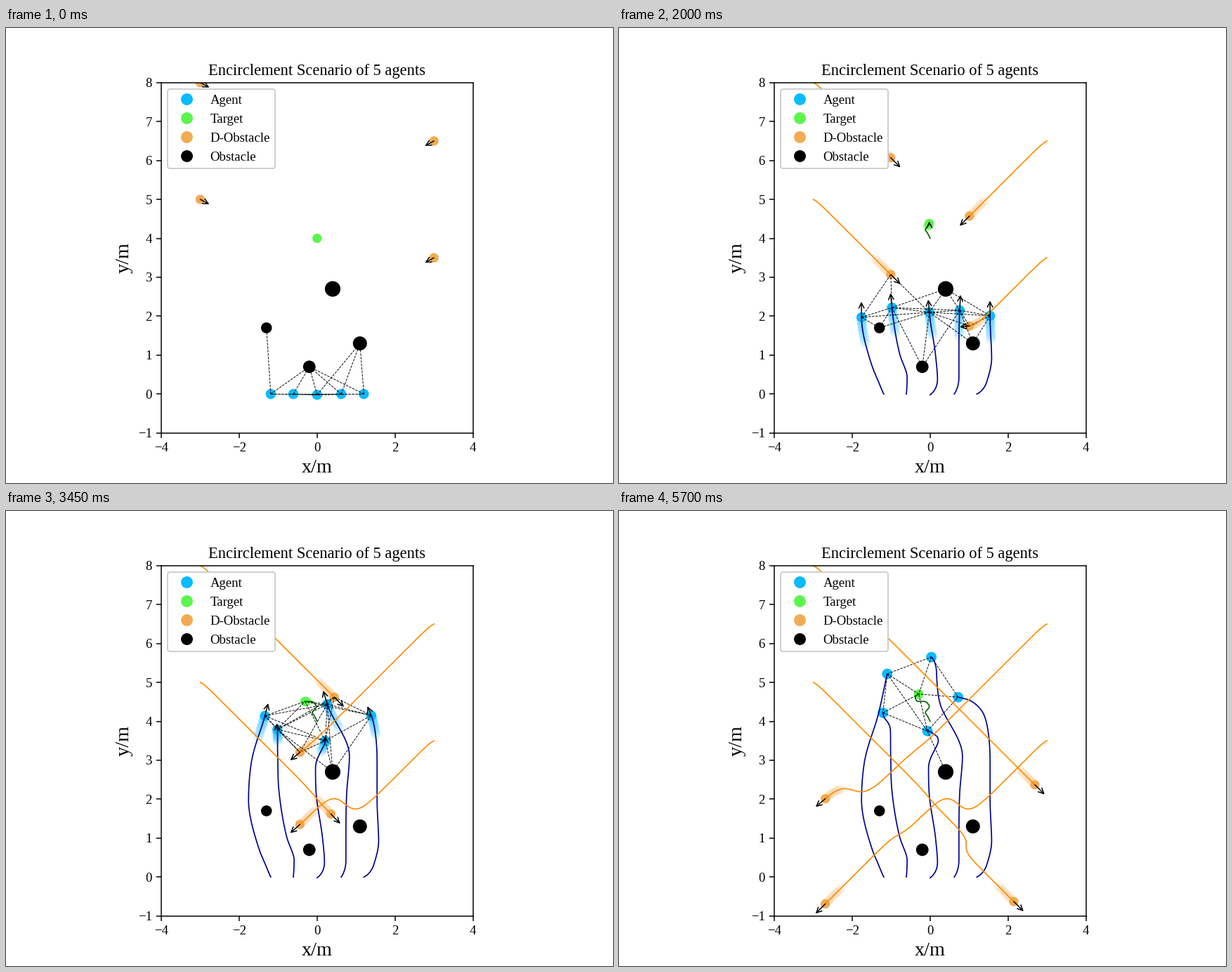
These frames come from a looping animation (864x648 px, 5.75 s). A matplotlib script:

```python
import itertools

import matplotlib.pyplot as plt
import numpy as np
from matplotlib.animation import FuncAnimation
from matplotlib.collections import EllipseCollection, LineCollection
from matplotlib.colors import to_rgb
from matplotlib.lines import Line2D
from matplotlib.patches import Circle, FancyArrowPatch

FRAMES, INTERVAL = 115, 50
SENSE = 1.8        # sensing range in metres
GHOSTS = 8         # fading discs behind every mover
ARROW = 5          # arrow length in steps of velocity
AGENT, TARGET, MOVING = "#0abbff", "#5cf54d", "#f2ab52"
T = np.arange(FRAMES)
WAYPOINT_STEPS = np.array([0, 16, 25, 40, 52, 69, 85, 114])


def track(*points):
    """Smooth path through the waypoints, at rest at both ends, no overshoot."""
    ts, p = WAYPOINT_STEPS, np.array(points, float)
    d = np.diff(p, axis=0) / np.diff(ts)[:, None]
    a, b = d[:-1], d[1:]
    m = np.gradient(p, ts, axis=0)
    m[0] = m[-1] = 0
    limit = 3 * np.minimum(abs(a), abs(b)) * (a * b > 0)
    m[1:-1] = np.clip(m[1:-1], -limit, limit)

    i = np.clip(np.searchsorted(ts, T, "right") - 1, 0, len(ts) - 2)
    h = (ts[i + 1] - ts[i])[:, None]
    u = (T - ts[i])[:, None] / h
    return ((1 + 2 * u) * (1 - u) ** 2 * p[i] + u * (1 - u) ** 2 * h * m[i]
            + u * u * (3 - 2 * u) * p[i + 1] + u * u * (u - 1) * h * m[i + 1])


def swerve(size, mid, width):
    """Evasion of the given size, centred on step mid."""
    return size / (1 + np.exp((mid - T) / width))


def drift(x0, y0, side, dx=0, dy=0):
    """Diagonal descent at constant speed after a short run-up."""
    e = 1 - np.exp(-T / 2.3)
    return np.column_stack([x0 + side * (0.05 * T - 0.01 * e) + dx,
                            y0 - 0.05 * T + 0.07 * e + dy])


agents = [
    track((-1.19, 0), (-1.31, .28), (-1.51, .78), (-1.76, 1.97),
          (-1.69, 2.93), (-1.34, 4.14), (-1.14, 5.04), (-1.10, 5.22)),
    track((-.61, 0), (-.59, .44), (-.78, 1.03), (-.98, 2.22),
          (-1.01, 3.05), (-1.02, 3.79), (-1.19, 4.12), (-1.21, 4.22)),
    track((0, -.02), (.19, .38), (.14, 1.00), (-.02, 2.10),
          (-.04, 2.80), (.21, 3.50), (.08, 3.68), (-.07, 3.75)),
    track((.62, 0), (.74, .42), (.74, .98), (.76, 2.15),
          (.83, 3.11), (.26, 4.44), (.15, 5.40), (.03, 5.65)),
    track((1.20, 0), (1.46, .33), (1.58, .91), (1.54, 2.01),
          (1.54, 2.97), (1.39, 4.15), (.93, 4.57), (.72, 4.62)),
]
target = track((0, 4), (-.07, 4.14), (-.12, 4.22), (-.02, 4.38),
               (-.14, 4.51), (-.31, 4.51), (-.38, 4.61), (-.29, 4.70))
drifters = [
    drift(-3, 8, 1),
    drift(-3, 5, 1, dx=-swerve(.09, 60, 3) - swerve(.45, 85, 2.2)),
    drift(3, 6.5, -1, dy=swerve(.13, 67, 3.5) + swerve(1.04, 99.8, 4)),
    drift(3, 3.5, -1, dy=swerve(1.22, 46, 3.4) + swerve(.22, 76, 2.5)),
]
obstacles = [(-1.3, 1.7, .14), (-.2, .7, .16), (1.1, 1.3, .18), (.4, 2.7, .2)]

# kind: fill, path colour, disc radius, ghost opacity from oldest to newest
kinds = ([(AGENT, "darkblue", .13, (.12, .25))] * len(agents)
         + [(TARGET, "darkgreen", .12, (.12, .25))]
         + [(MOVING, "darkorange", .12, (.11, .17))] * len(drifters))
fills, strokes, radii, fades = zip(*kinds)
rgb = [to_rgb(c) for c in fills]
alpha = np.array([[*np.linspace(*f, GHOSTS), 1] for f in fades]).T

pos = np.stack(agents + [target] + drifters, axis=1)    # step, mover, xy
vel = np.gradient(pos, axis=0)
fixed = np.array(obstacles)[:, :2]
N = len(kinds)

plt.rcParams["font.family"] = "Liberation Serif"
fig, ax = plt.subplots(figsize=(6.4, 4.8), dpi=135)
ax.set(xlim=(-4, 4), ylim=(-1, 8), aspect="equal",
       xticks=range(-4, 5, 2), yticks=range(-1, 9))
ax.set_title("Encirclement Scenario of 5 agents", fontsize=12)
ax.set_xlabel("x/m", fontsize=15)
ax.set_ylabel("y/m", fontsize=15)

for x, y, r in obstacles:
    ax.add_patch(Circle((x, y), r, color="black", lw=0))

size = np.tile(2 * np.array(radii), GHOSTS + 1)
discs = EllipseCollection(size, size, np.zeros_like(size), units="xy",
                          offsets=np.zeros((len(size), 2)),
                          offset_transform=ax.transData,
                          edgecolors="none", zorder=1)
ax.add_collection(discs, autolim=False)
links = LineCollection([], colors="black", linewidths=.5, linestyles="--", zorder=2)
ax.add_collection(links, autolim=False)
trails = [ax.plot([], [], color=c, lw=.9, zorder=2)[0] for c in strokes]
arrows = [ax.add_patch(FancyArrowPatch((0, 0), (1, 1), arrowstyle="->",
                                       mutation_scale=10, shrinkA=0, shrinkB=0,
                                       color="black", lw=.8, zorder=3))
          for _ in range(N)]

entries = [("Agent", AGENT), ("Target", TARGET),
           ("D-Obstacle", MOVING), ("Obstacle", "black")]
ax.legend(handles=[Line2D([], [], ls="", marker="o", ms=8, color=c, label=name)
                   for name, c in entries],
          loc="upper left", fontsize=10, framealpha=1, labelspacing=.53)


def sensed(now):
    """Segments from each agent to everything within range."""
    team = now[:len(agents)]
    others = np.vstack([fixed, now[len(agents):]])
    pairs = itertools.chain(itertools.combinations(team, 2),
                            itertools.product(team, others))
    return [(a, b) for a, b in pairs if np.hypot(*(b - a)) < SENSE]


def update(t):
    steps = np.arange(t - GHOSTS, t + 1)
    discs.set_offsets(pos[np.maximum(steps, 0)].reshape(-1, 2))
    rgba = np.empty((GHOSTS + 1, N, 4))
    rgba[..., :3] = rgb
    rgba[..., 3] = alpha * (steps >= 0)[:, None]
    discs.set_facecolor(rgba.reshape(-1, 4))

    links.set_segments(sensed(pos[t]))
    for i in range(N):
        trails[i].set_data(pos[:t + 1, i, 0], pos[:t + 1, i, 1])
        reach = ARROW * vel[t, i]
        arrows[i].set_visible(np.hypot(*reach) > .05)
        arrows[i].set_positions(pos[t, i], pos[t, i] + reach)
    return [discs, links, *trails, *arrows]


anim = FuncAnimation(fig, update, frames=FRAMES, interval=INTERVAL,
                     repeat=True, repeat_delay=0, blit=False)
plt.show()
```
